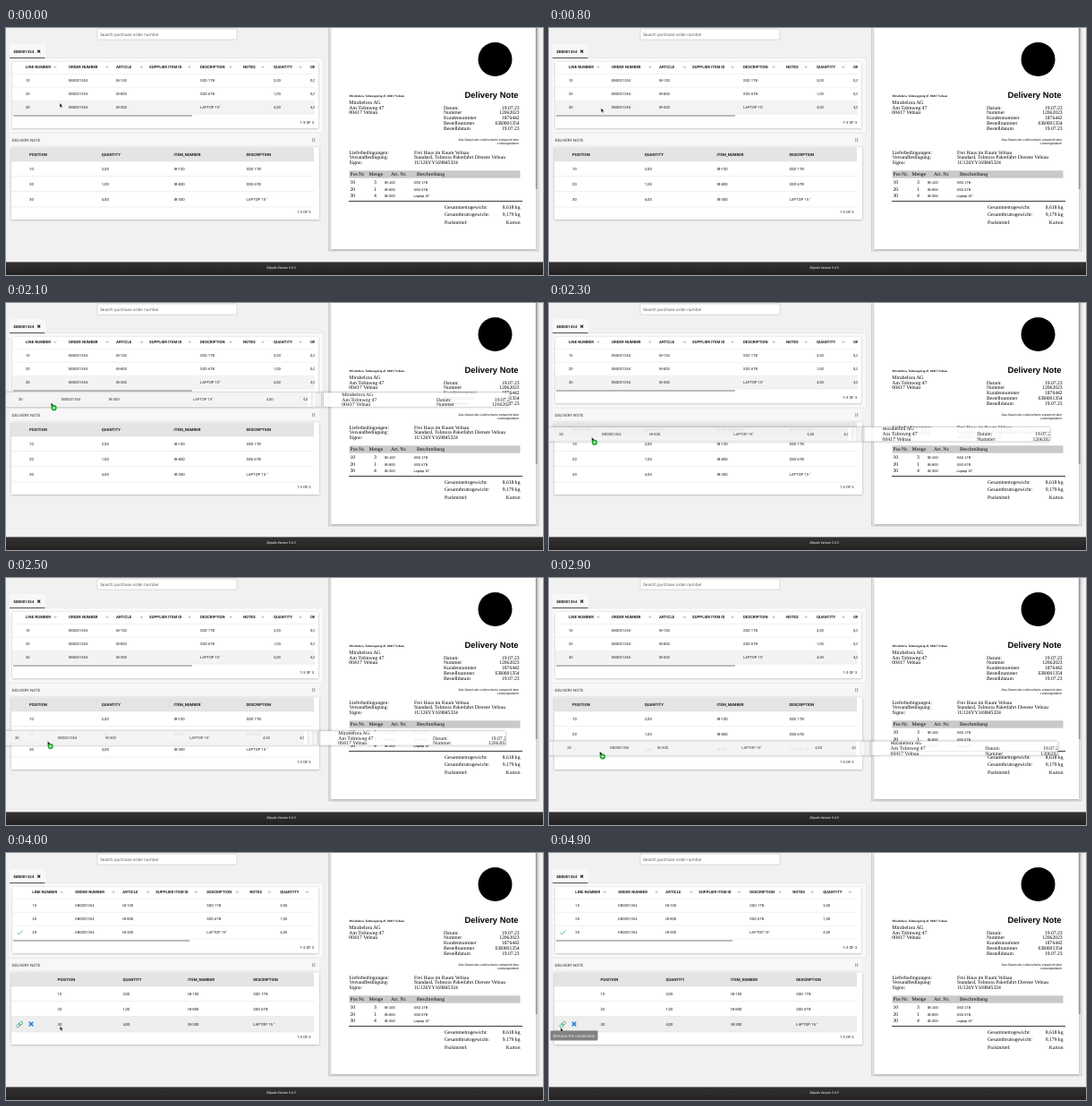
An HTML page that plays this animation: 600 px wide and 276 px high, repeating every 5000 ms.

```html
<!DOCTYPE html>
<html lang="en">
<head>
<meta charset="utf-8">
<title>Delivery note matching</title>
<style>
html, body { margin: 0; height: 100%; overflow: hidden; background: #f1f1f1; }
svg { display: block; width: 100vw; height: 100vh; font-family: Roboto, sans-serif; text-rendering: geometricPrecision; }
.serif { font-family: "Liberation Serif", serif; }
.sans { font-family: "Liberation Sans", sans-serif; }
#ghost { opacity: .9; filter: drop-shadow(0 0 1.6px rgba(0, 0, 0, .4)); }
</style>
</head>
<body>
<svg viewBox="0 0 600 276">
  <defs>
    <clipPath id="strip"><rect y="81.3" width="570" height="15.3"/></clipPath>
    <clipPath id="table"><rect x="7" y="38" width="338" height="74"/></clipPath>
    <linearGradient id="bar" x2="0" y2="1"><stop stop-color="#343133"/><stop offset="1" stop-color="#242123"/></linearGradient>
    <filter id="soft" x="-5%" y="-10%" width="110%" height="125%"><feDropShadow dx="0" dy=".6" stdDeviation=".8" flood-opacity=".28"/></filter>
  </defs>
  <g id="page"><g id="tables"></g><g id="note"></g></g>
  <g id="ghost"><g clip-path="url(#strip)"><use href="#page"/></g></g>
  <g id="tip">
    <rect x="1.5" y="198.5" width="53" height="11" rx="1" fill="#777"/>
    <text x="4.5" y="205.7" font-size="4.5" fill="#eee">Remove the connection</text>
  </g>
  <g id="cursor">
    <path d="M0 0V4.6L1.1 3.7L1.9 5.3L2.8 4.9L2 3.3H3.4Z" fill="#111" stroke="#fff" stroke-width=".3"/>
    <g id="plus"><circle cx="3.2" cy="5.8" r="3.1" fill="#1da32b"/><path d="M1.5 5.8h3.4M3.2 4.1v3.4" stroke="#fff" stroke-width=".8"/></g>
  </g>
</svg>
<script>
const $ = id => document.getElementById(id);
const text = (x, y, s, size, more = '') => `<text x="${x}" y="${y}" font-size="${size}" ${more}>${s}</text>`;
const rect = (x, y, w, h, fill, more = '') => `<rect x="${x}" y="${y}" width="${w}" height="${h}" fill="${fill}" ${more}/>`;
const line = (d, color, width = .5) => `<path d="${d}" fill="none" stroke="${color}" stroke-width="${width}"/>`;
const bold = 'font-weight="600" fill="#222"', right = 'text-anchor="end"';

const orderColumns = [
  [22, 'LINE NUMBER', 55, '10', '20', '30'],
  [70, 'ORDER NUMBER', 113, 'EB0001354', 'EB0001354', 'EB0001354'],
  [123, 'ARTICLE', 151.5, 'IB-100', 'IB-800', 'IB-300'],
  [160, 'SUPPLIER ITEM ID', 205, '', '', ''],
  [217, 'DESCRIPTION', 251, 'SSD 1TB', 'SSD 6TB', 'LAPTOP 15"'],
  [265, 'NOTES', 287, '', '', ''],
  [299, 'QUANTITY', 329, '3,00', '1,00', '4,00'],
  [340, 'ORDERED', 380, '0,00', '0,00', '4,00']
];
const noteColumns = [
  ['POSITION', '10', '20', '30'],
  ['QUANTITY', '3,00', '1,00', '4,00'],
  ['ITEM_NUMBER', 'IB-100', 'IB-800', 'IB-300'],
  ['DESCRIPTION', 'SSD 1TB', 'SSD 6TB', 'LAPTOP 15 "']
];

function drawTables(matched) {
  let s = rect(0, 0, 600, 276, '#f1f1f1')
    + rect(102, 1, 156, 12, '#fff', 'rx="1" stroke="#c4c4c4" stroke-width=".6"')
    + text(105, 8.9, 'Search purchase order number', 4.8, 'fill="#666"')
    + rect(4, 18, 40, 15, '#f8f8f8') + rect(4, 33.5, 350.5, 82.5, '#fafafa')
    + text(8.5, 27.8, 'EB0001354', 4.4, bold)
    + line('M35.2 24.6l3 3m0-3l-3 3', '#222', 1.2)
    + line('M4 33.4H43.5', '#333', .9) + line('M43.5 33.5H354.5V116', '#ddd')
    + rect(7, 38, 342, 74, '#fff', 'filter="url(#soft)"');

  s += `<g clip-path="url(#table)">`;
  if (!matched) s += rect(7, 81.5, 338, 14.5, '#f3f3f3');
  s += line('M7 51.3H345M7 66.3H345M7 81.3H345M7 96H345', '#e2e2e2')
    + `<g transform="translate(${matched ? 7.3 : 0})">`;
  for (const [x, title, arrow, ...cells] of orderColumns) {
    s += text(x, 45, title, 4.35, bold) + line(`M${arrow - 1.4} 43l1.4 1.3l1.4-1.3`, '#555', .6);
    cells.forEach((cell, i) => s += text(x, 60 + 15 * i, cell, 4.15, 'fill="#222"'));
  }
  s += '</g></g>' + line(`M8 98H${matched ? 205 : 208}`, '#777', 1)
    + text(344, 107, '1-3 OF 3', 4.2, right + ' fill="#222"');

  s += rect(4, 117.5, 346, 14, '#f7f7f7') + line('M4 117.5H350', '#e2e2e2')
    + text(6.5, 126.6, 'DELIVERY NOTE', 4.4, 'fill="#333"')
    + line('M342.7 123v4.2M344.7 123v4.2', '#777', .7)
    + rect(6, 133.5, 344, 80.5, '#fff', 'filter="url(#soft)"') + rect(6, 133.5, 338, 15.5, '#e4e4e4');
  if (matched) s += rect(6, 182.5, 338, 17.5, '#eee');
  s += line('M6 149H344M6 165.7H344M6 182.7H344M6 200H344', '#ddd');
  noteColumns.forEach(([title, ...cells], c) => {
    const x = matched ? 57.5 + 72.9 * c : 26 + 80.8 * c;
    s += text(x, 142.7, title, 4.35, bold);
    cells.forEach((cell, i) => s += text(x, 158.7 + 17.1 * i, cell, 4.25, 'fill="#222"'));
  });
  s += text(340.6, 206.5, '1-3 OF 3', 4.2, right + ' fill="#222"');
  if (matched) s += line('M12.5 89l2 2l4-4.3', '#35b58d', .9)
    + line('M25.7 188.8l4.6 4.6m0-4.6l-4.6 4.6', '#1c7fd6', 1.5)
    + `<g transform="rotate(-45 15.3 191.5)" fill="none" stroke="#35a979" stroke-width=".8">
      <rect x="11.3" y="190" width="4.6" height="3" rx="1.5"/><rect x="14.7" y="190" width="4.6" height="3" rx="1.5"/></g>`;
  $('tables').innerHTML = s;
}

function drawNote() {
  const size = 5.65;
  const pairs = (rows, x, valueX, y, step, more) => rows.map(([k, v], i) =>
    text(x, y + step * i, k, size) + text(valueX, y + step * i, v, size, more)).join('');
  let s = rect(360.5, -1, 234.5, 250, '#e6e6e6', 'stroke="#c6c6c6" stroke-width=".8"')
    + rect(363.3, 0, 228.7, 247, '#fff', 'filter="url(#soft)"') + rect(591.8, 0, 1.8, 180, '#999')
    + '<circle cx="546.5" cy="35" r="19" fill="#000"/>'
    + text(572.5, 78.2, 'Delivery Note', 9.4, right + ' class="sans" font-weight="700"')
    + '<g class="serif">'
    + text(383.5, 77, 'Mirabelora, Tolmwegsteig 47, 00417 Velnau', 3.3, 'font-weight="700"');
  ['Mirabelora AG', 'Am Tolmweg 47', '00417 Velnau'].forEach((t, i) => s += text(383.3, 84.8 + 5.8 * i, t, 5.8));
  s += pairs([['Datum:', '19.07.23'], ['Nummer', '12062023'], ['Kundennummer', '1876442'],
    ['Bestellnummer', 'EB0001354'], ['Bestelldatum', '19.07.23']], 489, 573.7, 90.5, 5.85, right)
    + pairs([['Lieferbedingungen:', 'Frei Haus im Raum Velnau'],
      ['Versandbedingung:', 'Standard, Tolmora Paketfahrt Dienste Velnau'],
      ['Signo:', '1U126YY169845324']], 383.5, 456, 140.6, 5.5)
    + pairs([['Gesamtnettogewicht:', '8,618 kg'], ['Gesamtbruttogewicht:', '9,179 kg'],
      ['Packmittel:', 'Karton']], 490, 574.5, 201.6, 8.8, right)
    + rect(383.5, 159.3, 191, 8.4, '#c9c9c9');
  [[384.5, 'Pos Nr.'], [405.5, 'Menge'], [430, 'Art. Nr.'], [459, 'Beschreibung']]
    .forEach(([x, t]) => s += text(x, 165.3, t, size));
  [['10', '3', 'IB-100', 'SSD 1TB'], ['20', '1', 'IB-800', 'SSD 6TB'], ['30', '4', 'IB-300', 'Laptop 15"']]
    .forEach(([pos, count, item, name], i) => {
      const y = 174.3 + 7.4 * i;
      s += text(384.5, y, pos, size) + text(411, y, count, size)
        + text(423, y, item, 4, 'class="sans"') + text(455.5, y, name, 3.8, 'class="sans"');
    });
  s += '</g>' + line('M383 193.6H577', '#333', 1);
  ['Das Datum des Lieferscheins entspricht dem', 'Leistungsdatum'].forEach((t, i) =>
    s += text(573, 125.8 + 3.9 * i, t, 3.4, right + ' class="sans" font-style="italic"'));
  s += rect(0, 261.5, 600, 14.5, 'url(#bar)')
    + text(307.5, 268.8, 'Zilpado Version 5.6.5', 3.5, 'text-anchor="middle" fill="#ddd" font-style="italic" font-weight="500"');
  $('note').innerHTML = s;
}

// time, x, y of the pointer
const path = [
  [0, 60, 84], [300, 56, 85.5], [600, 57, 88], [900, 58.8, 90.3], [1100, 58.8, 90.3], [1200, 59, 90.5],
  [1600, 59, 90.5], [1700, 58.5, 91], [1800, 57.5, 92.5], [2000, 52.5, 101], [2100, 50.4, 111.4],
  [2200, 49, 132], [2400, 46.5, 168], [2500, 46.5, 182.3], [2700, 50, 192], [2900, 56.7, 193.7],
  [3200, 60, 194], [3600, 60, 194], [4000, 60.3, 193.6], [4100, 60, 193.8], [4700, 13.5, 195.3], [4900, 13, 195.3]
];
function pointer(t) {
  const i = path.findIndex(p => p[0] >= t);
  if (i < 1) return path[0].slice(1);
  const [a, b] = [path[i - 1], path[i]], k = (t - a[0]) / (b[0] - a[0]);
  return [1, 2].map(n => a[n] + (b[n] - a[n]) * k);
}

let wasMatched;
function frame(now) {
  const t = Math.floor(now % 5000 / 100) * 100;
  const [x, y] = pointer(t);
  const matched = t >= 3800, dragging = t >= 1800 && t < 3600;
  if (matched !== wasMatched) drawTables(wasMatched = matched);
  $('cursor').setAttribute('transform', `translate(${x} ${y})`);
  $('ghost').setAttribute('transform', `translate(${x - 58.5} ${y - 92.3})`);
  $('ghost').style.display = $('plus').style.display = dragging ? '' : 'none';
  $('tip').style.opacity = Math.min(.92, Math.max(0, (t - 4600) / 250));
  requestAnimationFrame(frame);
}
drawNote();
requestAnimationFrame(frame);
</script>
</body>
</html>
```
